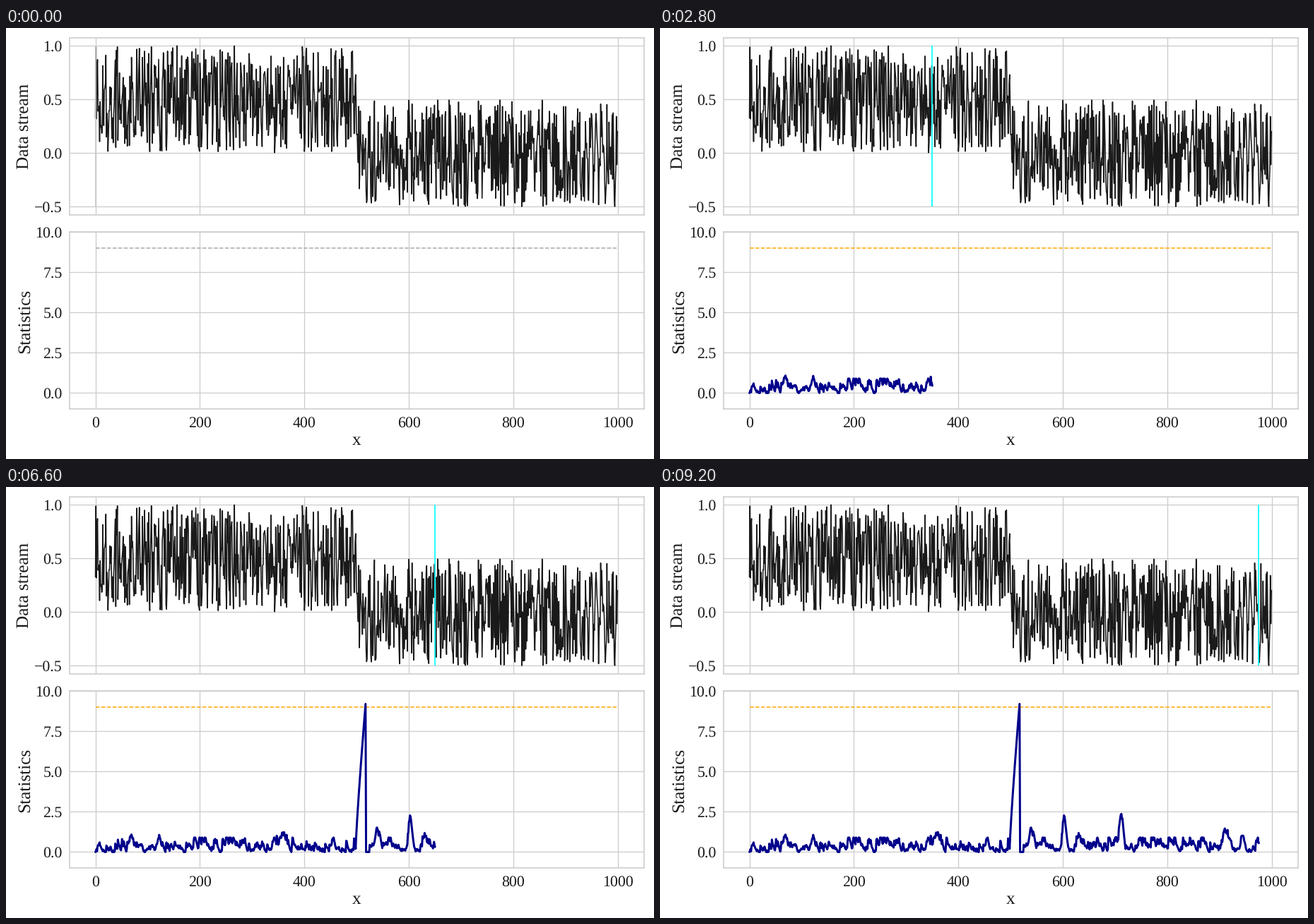
Write a matplotlib script that moves like this. It is 917 px wide and 611 px high and loops after 9.4 s.

```python
import numpy as np
import matplotlib.pyplot as plt
from matplotlib.animation import FuncAnimation

W, H, DPI = 917, 611, 100
FRAMES, INTERVAL = 47, 200
N, SHIFT, ALARM, RESUME, STEP = 1000, 500, 517, 525, 25
THRESHOLD = 9
INK, GRID = "#1a1a1a", "#cccccc"


def pt(px):
    return px * 72 / DPI


plt.rcParams.update({
    "font.family": "Liberation Serif",
    "text.color": INK,
    "text.hinting": "none",
    "axes.edgecolor": GRID,
    "axes.linewidth": pt(1.6),
    "axes.axisbelow": True,
    "grid.color": GRID,
    "grid.linewidth": pt(1.3),
    "lines.solid_capstyle": "round",
})


def make_stream(rng):
    """Uniform noise whose mean drops by one half at SHIFT."""
    return rng.random(N) - 0.5 * (np.arange(N) >= SHIFT)


def make_statistic(rng):
    """Leaky sum of noise with a few swells, a ramp to the alarm, a reset."""
    x = np.arange(N)
    stat = np.zeros(N)
    for i in range(1, N):
        stat[i] = max(0, 0.8 * stat[i - 1] + rng.exponential(0.17) - 0.1)
    stat = np.minimum(stat, 0.9)

    swells = [(69, 0.8), (122, 0.9), (342, 0.6), (362, 0.8), (539, 1.4),
              (603, 1.9), (632, 0.7), (712, 1.5), (912, 0.7), (944, 1.0)]
    for center, height in swells:
        stat += height * np.exp(-((x - center) / 5) ** 2)

    start = SHIFT - 2
    rise = np.linspace(0, 1, ALARM - start + 1)
    stat[start:ALARM + 1] = 0.2 + THRESHOLD * rise ** 0.85
    stat[ALARM + 1:RESUME] = 0
    stat[0] = 0
    return stat


def position(frame):
    """Samples read so far; reading pauses after the alarm."""
    if frame <= 20:
        return STEP * frame
    if frame < 28:
        return ALARM + (frame > 21)
    return RESUME + STEP * (frame - 28)


def add_panel(top, bottom, ylim, yticks):
    left, right = 89.6, 902.9
    ax = fig.add_axes([left / W, 1 - bottom / H,
                       (right - left) / W, (bottom - top) / H])
    ax.set(xlim=(-50, 1050), ylim=ylim, xticks=range(0, N + 1, 200),
           yticks=yticks)
    ax.grid(True)
    ax.tick_params(length=0, pad=pt(10), labelsize=pt(21.9), labelcolor=INK)
    return ax


def add_label(x, y, text, rotation=0):
    fig.text(x / W, 1 - y / H, text, size=pt(25.3), rotation=rotation,
             rotation_mode="anchor", ha="center", va="baseline")


rng = np.random.default_rng(8)
stream = make_stream(rng)
statistic = make_statistic(rng)

fig = plt.figure(figsize=(W / DPI, H / DPI), dpi=DPI, facecolor="white")
top_ax = add_panel(13.6, 264.9, (-0.575, 1.075), np.arange(-0.5, 1.1, 0.5))
low_ax = add_panel(289.2, 540.3, (-1, 10), np.arange(0, 10.1, 2.5))
top_ax.tick_params(labelbottom=False)
add_label(31.4, 139.2, "Data stream", 90)
add_label(33, 415.8, "Statistics", 90)
add_label(496, 591, "x")

top_ax.plot(stream, color=INK, lw=pt(1.6))
cursor, = top_ax.plot([0, 0], [-0.5, 1], lw=pt(1.7), solid_capstyle="butt")
limit, = low_ax.plot([0, N], [THRESHOLD] * 2, "--", lw=pt(1.5))
trace, = low_ax.plot([], [], color="darkblue", lw=pt(3))


def update(frame):
    x = position(frame)
    cursor.set_xdata([x, x])
    cursor.set_color("cyan" if frame else "#c8c8c8")
    limit.set_color("orange" if frame else "#a8a8a8")
    count = x + 1 if frame else 0
    trace.set_data(np.arange(count), statistic[:count])
    return cursor, limit, trace


anim = FuncAnimation(fig, update, frames=FRAMES, interval=INTERVAL,
                     repeat=True, repeat_delay=0)
plt.show()
```
